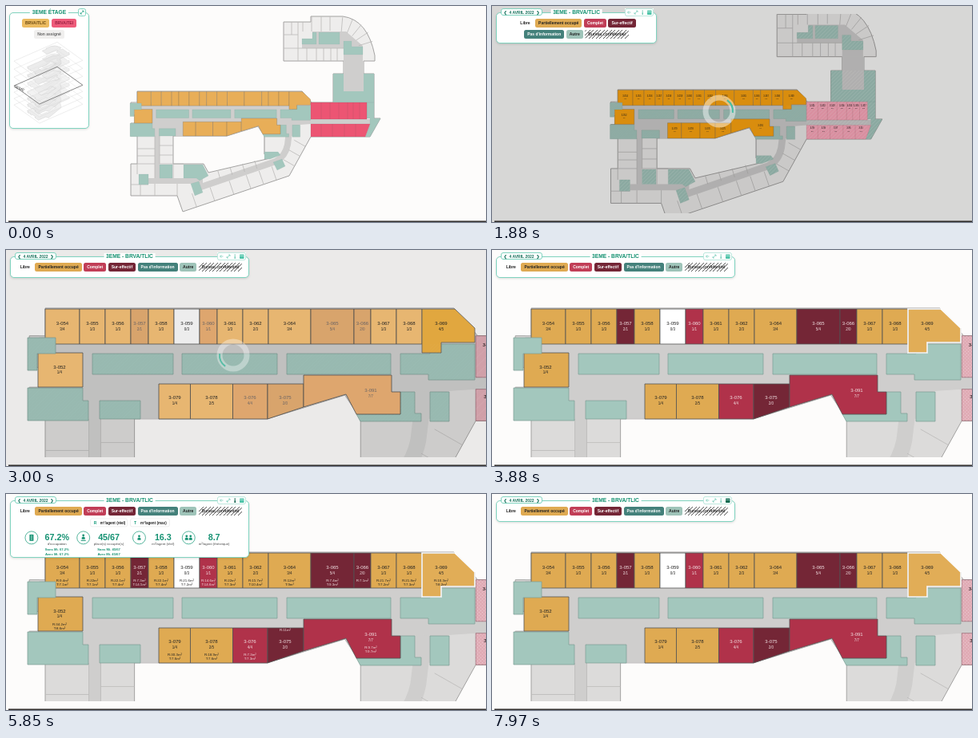
An HTML page that plays this animation: 600x271 px, repeating every 8000 ms.

```html
<!DOCTYPE html>
<html lang="fr">
<head>
<meta charset="utf-8">
<title>Plan d'étage</title>
<style>
html, body { margin: 0; width: 600px; height: 271px; overflow: hidden; background: #fdfcfb; }
body { position: relative; font-family: "Liberation Sans", Arial, sans-serif; }
svg { display: block; }
#scene { position: absolute; left: 0; top: 0; }
#scene text { text-anchor: middle; }
#map path, #map rect { vector-effect: non-scaling-stroke; }
.panel { position: absolute; box-sizing: border-box; background: #fff; border: 1px solid #7fd3bf; border-radius: 5px; box-shadow: 0 1px 3px #0002; }
.title { position: absolute; left: 50%; top: -5px; transform: translateX(-50%); padding: 0 3px; background: #fff; color: #12906f; font: bold 6.65px/8px "Liberation Sans", Arial, sans-serif; white-space: nowrap; }
.tags { display: flex; flex-wrap: wrap; justify-content: center; gap: 3px 2.5px; padding: 7px 3px 5px; position: relative; }
.tag { height: 11px; padding: 0 4px; border-radius: 2.5px; font: bold 5px/11px "Liberation Sans", Arial, sans-serif; white-space: nowrap; }
#floors { left: 4px; top: 8px; width: 100px; height: 146px; }
#floors .tags { padding: 7px 8px; gap: 3px; }
#detail { left: 5px; top: 8px; }
#date { position: absolute; left: 5px; top: -6px; width: 52px; height: 9px; box-sizing: border-box; border: .6px solid #7fd3bf; border-radius: 3px; background: #fff; color: #12705a; font: bold 5px/8px "Liberation Sans", Arial, sans-serif; text-align: center; white-space: nowrap; }
#tools { position: absolute; right: 3px; top: -6px; background: #fff; }
#info { position: absolute; left: 0; top: 0; width: 100%; height: 100%; overflow: hidden; }
#info text { text-anchor: middle; }
#calendar { position: absolute; left: 306px; top: 10px; width: 75px; height: 96px; box-sizing: border-box; padding: 3px 4px; background: #fff; border: .6px solid #ccc; border-radius: 3px; box-shadow: 0 1px 4px #0003; font-size: 4.5px; text-align: center; color: #333; }
#calendar header { display: flex; justify-content: space-between; line-height: 8px; }
#days { display: grid; grid-template-columns: repeat(7, 1fr); grid-auto-rows: 10.5px; line-height: 10.5px; }
#calendar footer { color: #d18a1c; line-height: 7px; }
</style>
</head>
<body>
<svg id="scene" width="600" height="271"></svg>

<div class="panel" id="floors">
  <div class="title">3EME ÉTAGE</div>
  <svg style="position:absolute;left:85px;top:-6px" width="10" height="10"><rect x=".5" y=".5" width="9" height="9" rx="2" fill="#fff" stroke="#7fd3bf"/><path d="M3 7L7 3M5 3H7V5M3 5V7H5" fill="none" stroke="#159b7b" stroke-width=".7"/></svg>
  <div class="tags">
    <div class="tag" style="background:#ecbb60;color:#6b4a12">BRVA/TLIC</div>
    <div class="tag" style="background:#ee5b7a;color:#9a2444">BRVA/TEI</div>
    <div class="tag" style="background:#f0efee;color:#666">Non assigné</div>
  </div>
  <svg id="stack" style="position:absolute;left:-5px;top:-9px" width="104" height="154"></svg>
</div>

<div class="panel" id="detail">
  <svg id="info" viewBox="5 9 298 72" preserveAspectRatio="xMinYMin slice"></svg>
  <div class="tags" id="legend"></div>
  <div class="title">3EME - BRVA/TLIC</div>
  <div id="date">❮&nbsp; 4 AVRIL 2022 &nbsp;❯</div>
  <svg id="tools" width="36" height="10">
    <rect x=".4" y=".4" width="35.2" height="9.2" rx="2.5" fill="#fff" stroke="#9bdccc" stroke-width=".7"/>
    <g fill="none" stroke="#7fd0bd" stroke-width=".8">
      <path d="M7.500 5H3.500L5.300 3.200M3.500 5L5.300 6.800"/>
      <path d="M12 7L16 3M14 3H16V5M12 5V7H14"/>
    </g>
    <path id="infoIcon" d="M21.500 2.500H23V3.700H21.500ZM21.500 4.500H23V8H21.500Z"/>
    <g id="calIcon"><rect x="28" y="2.500" width="5.500" height="5.500" rx=".7"/><path d="M28 4.300H33.500" stroke="#fff" stroke-width=".5"/></g>
  </svg>
</div>

<div id="calendar">
  <header><span>‹</span><span>mars 2022</span><span>›</span></header>
  <div id="days"></div>
  <footer>Aujourd'hui</footer>
</div>

<script>
const $ = id => document.getElementById(id);
const LOOP = 8000, ZOOM = 2.48, DX = -357.7, DY = -192.4;
const TEAL = '#a3c7bd', HALL = '#cfcecd';
const seg = (t, a, b) => Math.min(1, Math.max(0, (t - a) / (b - a)));
const ease = u => u < .5 ? 4 * u ** 3 : 1 - 4 * (1 - u) ** 3;
const rgb = c => [1, 3, 5].map(i => parseInt(c.slice(i, i + 2), 16));
const mix = (a, b, u) => {
  const q = rgb(b);
  return '#' + rgb(a).map((v, i) => Math.round(v + (q[i] - v) * u).toString(16).padStart(2, '0')).join('');
};
const box = (x, y, r, b) => `M${x} ${y}H${r}V${b}H${x}Z`;

// Building shape, in overview coordinates
const outer = 'M164 107H370L382 121H409V85H422V69H347V20H381V13H421Q452 17 461 62V69H447V85H460V141H468L455 164H381L354 213L221 258L214 238H156V198H164V163H156V147H161V137H156V121H164Z';
const court = 'M209 163H276L315 151L323 163V186L330 191L253 209L247 198H209Z';
const halls = 'M161 121H382V142H456V148H381L367 149V163H323L315 151L276 163H161Z'
  + 'M186 163H192V216H246V223H178V216H186ZM383 32H425L446 50V107H422V53H370V41H383Z';
const teals = box(409, 85, 460, 121) + 'M451 121H460V141H468L455 164H449L455 148V141H451Z'
  + 'M383 33H388V48H370V41H383Z' + box(391, 33, 417, 48) + 'M422 44H432V51H446V61H422Z'
  + box(166, 211, 178, 224) + box(192, 199, 208, 216) + 'M222 199H246L253 213L242 219L238 216H222Z'
  + 'M231 223L241 220L246 234L236 238ZM323 183H340L343 187L330 192H323ZM334 196L345 192L349 201L339 206Z';

// Office areas, in close-up coordinates
const cornerTeal = 'M27 110H62V130H39V151H27Z';
const closeTeals = 'M27 173H96V189H103V214H27Z'
  + box(117, 189, 168, 212) + box(108, 130, 209, 156) + box(220, 130, 339, 156) + box(351, 130, 481, 156)
  + 'M493 130H530V118H586V163H528V156H493ZM493 178H511V205H519V215H443L438 206H493Z' + box(530, 178, 554, 215);

function ticks() {
  let d = '';
  for (let a = -85; a < 0; a += 17) {
    const c = Math.cos(a * Math.PI / 180), s = Math.sin(a * Math.PI / 180);
    d += `M${417 + 25 * c} ${57 + 25 * s}L${417 + 43 * c} ${57 + 43 * s}`;
  }
  for (const u of [.13, .3, .48, .64, .76, .88]) d += `M${221 + 133 * u} ${258 - 45 * u}l-5.800 -17`;
  for (const u of [.15, .35, .55, .75]) d += `M${253 + 77 * u} ${209 - 20 * u}l3 10`;
  for (const u of [.25, .5, .75]) d += `M${354 + 27 * u} ${213 - 49 * u}l-14 -8`;
  return d;
}
const lines = 'M164 179H186M164 188H186M164 198H186M186 163V216M192 163V198M192 175H209M192 187H209M192 198H222M209 198V216'
  + 'M164 198V211M156 224H178M168 224V238M186 223V238M214 223V238M323 163V186'
  + 'M365 20V69M347 36H365M347 53H422M357 20V36M371 20V32M382 13V32M394 13V32M405 13V31M376 53V69M388 53V69M397 53V69M406 53V69M414 53V69' + ticks();

const look = {
  p: { mid: '#f9c67c', end: '#dfaa52' },
  h: { mid: '#f3b443', end: '#e1ad57' },
  f: { mid: '#ffffff', end: '#ffffff' },
  c: { mid: '#f3bb79', end: '#b0324a', light: 1 },
  s: { mid: '#efb878', end: '#742636', light: 1 }
};
const edges = [49, 92, 124, 156, 178, 210, 242, 264, 296, 328, 381, 435, 456, 488, 520];
const topRow = '054 3/4 p 9.4 7.1,055 1/3 p 22 7.1,056 1/3 p 22.1 7.4,057 2/1 s 7.3 14.5,058 1/3 p 22.1 7.4,059 0/3 f 21.6 7.2,060 1/1 c 14.6 14.6,061 1/3 p 22 7.3,062 2/3 p 15.7 10.4,064 3/4 p 12 9,065 5/4 s 7.4 9.3,066 2/0 s 7.1,067 1/3 p 21.7 7.2,068 1/3 p 21.8 7.3';
const rooms = topRow.split(',').map((s, i) => [s, box(edges[i], 74, edges[i + 1], 118), (edges[i] + edges[i + 1]) / 2, 94]);
rooms.push(
  ['052 1/4 p 34.2 8.6', box(40, 129, 96, 172), 67, 148.500],
  ['079 1/4 p 30.3 7.6', box(191, 168, 230.500, 212), 211, 187],
  ['078 2/5 p 18.9 7.6', box(230.500, 168, 283.500, 212), 257, 187],
  ['076 4/4 c 7.3 7.3', box(283.500, 168, 327, 212), 305, 187],
  ['075 2/0 s 11', 'M327 168H372V197L327 212Z', 349, 187],
  ['091 7/7 c 9.7 9.7', 'M372 157H482V178H493V206H438L425 181L372 197Z', 456, 178],
  ['069 4/5 h 10.3 8.2', 'M520 74H561L586 98V116H544V129H520Z', 544, 94]
);

function roomMarkup([data, d, x, y]) {
  const [id, use, kind, real, max] = data.split(' ');
  const area = (k, v, dy) => v ? `<text class="area" x="${x}" y="${y + dy}" font-size="4.4">${k}:${v}m²</text>` : '';
  const tight = id === '075';
  return `<g class="room" data-kind="${kind}"><path class="wall" d="${d}" stroke="#555" stroke-width=".8"/><g class="label">
    <text x="${x}" y="${y}" font-size="6">3-${id}</text><text x="${x}" y="${y + 6.500}" font-size="4.5">${use}</text>
    ${area('R', real, tight ? -15 : 16)}${area('T', max, 21)}</g></g>`;
}

// Neighbouring wing, in overview coordinates
function wing() {
  const upper = [381, 394, 405, 416, 427, 434, 442, 451], lower = [381, 394, 408, 423, 437];
  let d = box(381, 121, 451, 142) + 'M381 148H455L449 164H381Z', txt = '';
  upper.slice(1, -1).forEach(x => d += `M${x} 121V142`);
  lower.slice(1).forEach(x => d += `M${x} 148V164`);
  const label = (x, y, n) => txt += `<text x="${x}" y="${y}" font-size="2.4">3-${n}</text><text x="${x}" y="${y + 2.800}" font-size="1.8">0/${n % 3 + 1}</text>`;
  upper.slice(0, -1).forEach((x, i) => label((x + upper[i + 1]) / 2, 126.500, 101 + i));
  lower.forEach((x, i) => label(x + 6.500, 152.500, 99 - i));
  return `<path id="wing" class="wall" d="${d}" stroke="#8a5560" stroke-width=".6"/><path d="${d}" fill="url(#dots)" class="after"/><g class="label">${txt}</g>`;
}

const inner = `translate(${-DX / ZOOM} ${-DY / ZOOM}) scale(${1 / ZOOM})`;
$('scene').innerHTML = `<defs>
  <clipPath id="view"><rect y="10" width="600" height="250"/></clipPath>
  <pattern id="hatch" width="3" height="3" patternUnits="userSpaceOnUse" patternTransform="rotate(45)"><path d="M0 0V3" stroke="#fff" stroke-width="1"/></pattern>
  <pattern id="dots" width="1.200" height="1.200" patternUnits="userSpaceOnUse" patternTransform="rotate(45)"><circle cx=".6" cy=".6" r=".2" fill="#fff8"/></pattern>
  <path id="shape" d="${outer}${court}" fill-rule="evenodd"/>
</defs>
<g clip-path="url(#view)"><g id="map">
  <path id="base" d="${outer}${court}" fill-rule="evenodd" stroke="#a3a2a1"/>
  <path d="${halls}" fill="${HALL}"/>
  <path d="M241 228L337 195Q349 189 352 174L355 149" fill="none" stroke="${HALL}" stroke-width="8" style="vector-effect:none"/>
  <path d="${lines}" fill="none" stroke="#bab9b8" stroke-width=".8"/>
  <path class="wall" d="${teals}" fill="${TEAL}" stroke="#86a99f" stroke-width=".5"/>
  <path d="${box(422, 69, 447, 107)}" fill="${HALL}"/>
  ${wing()}
  <g transform="${inner}">
    <path class="wall" d="${closeTeals}" fill="${TEAL}" stroke="#7c9d94" stroke-width=".7"/>
    ${rooms.map(roomMarkup).join('')}
    <path class="wall" d="${cornerTeal}" fill="${TEAL}" stroke="#7c9d94" stroke-width=".7"/>
    <path id="hover" d="${rooms[20][1]}" fill="none" stroke="#fff" stroke-width="1.600"/>
  </g>
  <g class="loading" fill="url(#hatch)" fill-opacity=".25"><path d="${teals}"/><path d="${box(381, 121, 451, 164)}"/><g transform="${inner}"><path d="${closeTeals}${cornerTeal}"/></g></g>
</g></g>
<rect x="3" y="269.500" width="597" height="1.500" fill="#33302e"/>
<rect id="veil" width="600" height="271"/>
<g id="loader" fill="none"><circle cx="284" cy="132" r="17" stroke="#fff" stroke-opacity=".45" stroke-width="7"/>
  <circle id="spin" cx="284" cy="132" r="17" stroke="#48bfa4" stroke-width="2" stroke-dasharray="18 200"/></g>`;

// Stack of storeys in the first panel
const storey = (dy, on) => `<g transform="matrix(.159 -.07 .118 .085 -12.300 ${109.9 + dy})">
  <use href="#shape" fill="${on ? '#e6e6e6' : '#d8d8d8'}" fill-opacity=".6" stroke="#b5b5b5" stroke-width="2"/>
  <path d="${box(140, 0, 480, 270)}" fill="#fff" fill-opacity=".2" stroke="${on ? '#777' : '#ddd'}" stroke-width="${on ? 5 : 3}"/></g>`;
$('stack').innerHTML = [24, 16, 8, -11, -21, -31].map(y => storey(y)).join('') + storey(0, true)
  + '<text transform="translate(10 102) rotate(25)" font-size="5" fill="#444">3EME</text>';

const hatchCss = 'repeating-linear-gradient(-45deg,#555 0 .7px,#fff .7px 3.2px)';
$('legend').innerHTML = [
  ['Libre', '#fff', '#222'], ['Partiellement occupé', '#dfaa52', '#222'], ['Complet', '#c13e57', '#fff'],
  ['Sur-effectif', '#742636', '#fff'], ["Pas d'information", '#44817b', '#fff'], ['Autre', '#9fc4b9', '#222'],
  ['Bureau confidentiel', hatchCss, '#333']
].map(([s, bg, c]) => `<div class="tag" style="background:${bg};color:${c}">${s}</div>`).join('');

const line = (x, y, size, s, fill = '#169273', w = 'bold') => `<text x="${x}" y="${y}" font-size="${size}" font-weight="${w}" fill="${fill}">${s}</text>`;
const person = (x, y) => `<circle cx="${x}" cy="${y - 2}" r="1.400"/><path d="M${x - 2} ${y + 3}V${y + 1}Q${x} ${y - 1.500} ${x + 2} ${y + 1}V${y + 3}Z"/>`;
const stats = [
  [31, 63, '67.2%', "d'occupation", '67.2%', '<path d="M28.500 51H33.500V59H28.500Z"/><path d="M30 53H32M30 55H32M30 57H32" stroke="#fff" stroke-width=".7"/>'],
  [96, 128, '45/67', 'place(s) occupée(s)', '45/67', person(96, 54) + '<path d="M93 58H99V59H93Z"/>'],
  [166, 196, '16.3', 'm²/agent (réel)', '', person(166, 55)],
  [228, 260, '8.7', 'm²/agent (théorique)', '', person(225.500, 55) + person(230.500, 55)]
];
$('info').innerHTML = `<g fill="#fff" stroke="#ddd" stroke-width=".5"><rect x="105" y="31" width="46" height="10" rx="2"/><rect x="155" y="31" width="49" height="10" rx="2"/></g>`
  + line(111, 37.800, 5, 'R', '#159b7b') + line(133, 37.800, 4.600, 'm²/agent (réel)', '#222')
  + line(161, 37.800, 5, 'T', '#159b7b') + line(184, 37.800, 4.600, 'm²/agent (max)', '#222')
  + stats.map(([cx, x, big, small, alt, icon]) => `<circle cx="${cx}" cy="55" r="8" fill="#fff" stroke="#2ba384" stroke-width=".8"/><g fill="#169273">${icon}</g>`
    + line(x, 58, 10.800, big) + line(x, 64, 4.300, small, '#444', 'normal')
    + (alt ? line(x, 71.500, 4.200, 'Sans Mi. ' + alt) + line(x, 77.500, 4.200, 'Avec Mi. ' + alt) : '')).join('');

$('days').innerHTML = [...'LMMJVSD'].map(s => `<b>${s}</b>`).join('')
  + Array.from({ length: 35 }, (_, i) => `<span style="color:${i < 1 || i > 31 ? '#bbb' : '#333'}">${i < 1 ? 28 : i > 31 ? i - 31 : i}</span>`).join('');

const all = s => [...document.querySelectorAll(s)];
const roomNodes = all('.room').map(g => ({ path: g.firstChild, label: g.querySelector('.label'), ...look[g.dataset.kind] }));
const labels = all('.label'), areas = all('.area'), loading = all('.loading'), after = all('.after'), walls = all('.wall');
const fade = (els, o) => els.forEach(e => e.style.opacity = o);

function draw(t) {
  const zoom = ease(seg(t, 1697, 2447));
  const start = seg(t, 1400, 1700), busy = start - seg(t, 2880, 3110);
  const mid = seg(t, 2450, 2800), end = seg(t, 2980, 3350);
  const open = ease(seg(t, 4680, 4950)) - ease(seg(t, 5850, 6120));

  $('map').setAttribute('transform', `translate(${DX * zoom} ${DY * zoom}) scale(${1 + (ZOOM - 1) * zoom})`);
  $('base').setAttribute('fill', mix('#eeedec', '#dcdbda', zoom));
  $('wing').setAttribute('fill', mix(mix('#ec5573', '#ffa8bc', start), '#e0abb5', mid));
  walls.forEach(w => w.setAttribute('stroke-opacity', .3 + .7 * zoom));
  const loadFill = mix('#e8ae58', '#ffa510', start);
  for (const r of roomNodes) {
    r.path.setAttribute('fill', mix(mix(loadFill, r.mid, mid), r.end, end));
    r.label.setAttribute('fill', r.light ? mix('#222222', '#f3e4e6', seg(t, 2880, 3200)) : '#222');
  }
  fade(labels, start);
  fade(areas, open);
  fade(loading, start - seg(t, 2700, 3100));
  fade(after, end);
  $('hover').style.opacity = end;

  $('veil').style.opacity = .15 * busy;
  $('loader').style.opacity = start - seg(t, 2950, 3200);
  $('spin').setAttribute('transform', `rotate(${-55 + (t - 1880) * 540 / 1120} 284 132)`);

  $('floors').style.opacity = 1 - seg(t, 1400, 1650);
  $('detail').style.opacity = seg(t, 1700, 1840);
  $('detail').style.width = 100 + 199 * ease(seg(t, 1700, 2060)) + 'px';
  $('detail').style.minHeight = 26.5 + 46 * open + 'px';
  $('info').style.opacity = open;
  $('infoIcon').setAttribute('fill', t > 4600 && t < 6000 ? '#0b5f49' : '#7fd0bd');
  $('calIcon').setAttribute('fill', t > 6350 ? '#0b6a50' : '#4fc4a9');
  $('calendar').style.opacity = seg(t, 6730, 6930) - seg(t, 7500, 7700);
}

function tick() {
  draw(performance.now() % LOOP);
  requestAnimationFrame(tick);
}
tick();
</script>
</body>
</html>
```
